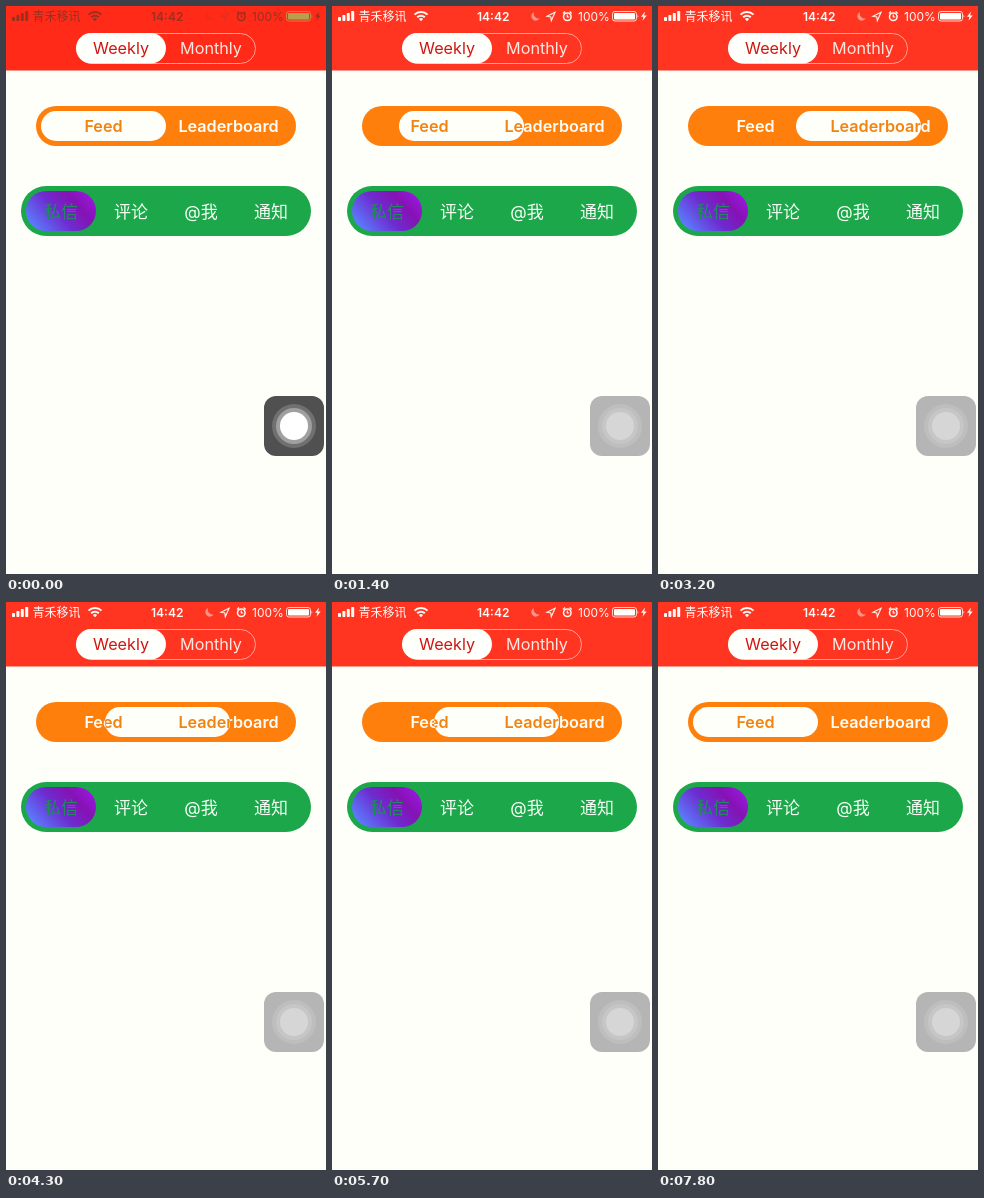
Recreate the animation shown at these times as an HTML page. Size 320 by 568 pixels, loop 8000 ms.

```html
<!DOCTYPE html>
<html lang="zh-CN">
<head>
<meta charset="utf-8">
<title>Segmented controls</title>
<style>
  html, body { margin: 0; width: 100%; height: 100%; overflow: hidden; background: #fffffa; }
  svg { display: block; width: 100%; height: 100%; }
  text { font: 16.2px Inter, "Noto Sans CJK SC", sans-serif; text-anchor: middle; }
  .bold text { font-weight: 600; }
  .tabs text { font-size: 17px; }
  #status text { font-size: 12px; text-anchor: start; }
</style>
</head>
<body>
<svg viewBox="0 0 320 568">
  <defs>
    <linearGradient id="violet" x1="0" y1=".75" x2="1" y2=".25">
      <stop offset="0" stop-color="#5a80ff"/>
      <stop offset=".45" stop-color="#6d2cd0"/>
      <stop offset=".75" stop-color="#8512b4"/>
      <stop offset="1" stop-color="#9a18dc"/>
    </linearGradient>
    <clipPath id="thumbClip"><rect id="clipThumb" y="105" width="125" height="30" rx="15"/></clipPath>
    <g id="labels" class="bold">
      <text x="97.5" y="126">Feed</text>
      <text x="222.5" y="126">Leaderboard</text>
    </g>
  </defs>

  <rect width="320" height="568" fill="#fffffa"/>
  <rect id="header" width="320" height="64.5"/>

  <g id="status">
    <rect x="6" y="11" width="3" height="4" rx=".7"/>
    <rect x="10.4" y="9" width="3" height="6" rx=".7"/>
    <rect x="14.8" y="7" width="3" height="8" rx=".7"/>
    <rect x="19.2" y="5" width="3" height="10" rx=".7"/>
    <text x="26.5" y="14.5">青禾移讯</text>
    <g fill="none" stroke="currentColor" stroke-width="2">
      <path d="M82.5 8.6a9.2 9.2 0 0 1 13 0M85.2 11.3a5.4 5.4 0 0 1 7.6 0"/>
    </g>
    <path d="M86.9 13a3 3 0 0 1 4.2 0L89 15.2z"/>
    <g class="bold"><text x="145" y="14.5">14:42</text></g>
    <g id="faint">
      <path opacity=".5" d="M202 6a4.5 4.5 0 1 0 5.6 6.5A5 5 0 0 1 202 6z"/>
      <path d="M223 6.3l-8 4 3.8.6.5 3.8z" fill="none" stroke="currentColor" stroke-width="1.1"/>
    </g>
    <g fill="none" stroke="currentColor">
      <circle cx="235.3" cy="10.7" r="3.8" stroke-width="1.5"/>
      <path d="M235.3 8.4v2.6h2M231 7.5l2-2M239.6 7.5l-2-2" stroke-width="1.2"/>
    </g>
    <text x="246" y="14.5">100%</text>
    <g id="battery">
      <rect x="280.5" y="5.5" width="24" height="9.5" rx="2.4" fill="none" stroke="currentColor" stroke-width=".8"/>
      <rect x="282" y="7" width="21" height="6.5" rx="1"/>
      <path d="M305.6 8.5q1.6 1.7 0 3.4z"/>
    </g>
    <path d="M313 5.5l-4 5.3h2.5l-1 4 4.2-5.4h-2.6z"/>
  </g>

  <rect x="70.5" y="27.5" width="179" height="30" rx="15" fill="none" stroke="#ffa195"/>
  <rect x="70" y="27" width="90" height="30.5" rx="15.2" fill="#fffffc"/>
  <text x="115" y="48" fill="#d01512">Weekly</text>
  <text x="205" y="48" fill="#ffe9e2">Monthly</text>

  <rect x="30" y="100" width="260" height="40" rx="20" fill="#ff7f0d"/>
  <use href="#labels" fill="#fffdf5"/>
  <g clip-path="url(#thumbClip)">
    <rect x="30" y="100" width="260" height="40" fill="#fffffa"/>
    <use href="#labels" fill="#f18312"/>
  </g>

  <rect x="15" y="180" width="290" height="50" rx="25" fill="#1ca84a"/>
  <rect x="20" y="185" width="70" height="40" rx="20" fill="url(#violet)"/>
  <g class="tabs" fill="#f5fff5">
    <text x="55" y="211.5" fill="#208a5c">私信</text>
    <text x="125" y="211.5">评论</text>
    <text x="195" y="211.5">@我</text>
    <text x="265" y="211.5">通知</text>
  </g>

  <rect id="pad" x="258" y="390" width="60" height="60" rx="12"/>
  <circle id="outer" cx="288" cy="420" r="22"/>
  <circle id="middle" cx="288" cy="420" r="18"/>
  <circle id="inner" cx="288" cy="420" r="14"/>
</svg>

<script>
const LOOP = 8000, STEP = 100;
const $ = id => document.getElementById(id);

// [time, thumb x]: four sweeps, each quicker than the last
const path = [
  [0, 35], [400, 35], [1400, 67], [2500, 109], [3200, 138], [3600, 160],
  [3700, 160], [4300, 99], [4800, 55], [5200, 35],
  [5300, 35], [5500, 60], [5700, 102], [5800, 160],
  [5900, 160], [6200, 35], [LOOP, 35]
];

// colours before and after the opening fade
const fades = {
  header: [[255, 43, 24], [255, 53, 33]],
  status: [[154, 48, 32], [255, 250, 246]],
  faint: [[226, 48, 30], [255, 244, 238]],
  battery: [[184, 158, 78], [255, 255, 250]],
  pad: [[80, 80, 80], [181, 181, 181]],
  outer: [[112, 112, 112], [190, 190, 190]],
  middle: [[160, 160, 160], [198, 198, 198]],
  inner: [[255, 255, 255], [214, 214, 214]]
};

const mix = (a, b, k) => a + (b - a) * k;

function thumbX(t) {
  const i = path.findIndex(([time]) => time > t);
  const [t0, x0] = path[i - 1], [t1, x1] = path[i];
  return mix(x0, x1, (t - t0) / (t1 - t0));
}

function draw(now) {
  const t = Math.floor(now % LOOP / STEP) * STEP;
  $("clipThumb").setAttribute("x", thumbX(t));
  const k = Math.min(1, t / 300);
  for (const [id, [from, to]] of Object.entries(fades)) {
    const color = `rgb(${from.map((c, i) => Math.round(mix(c, to[i], k)))})`;
    $(id).style.fill = $(id).style.color = color;
  }
  // outlined icons inherit the colour as stroke only
  document.querySelectorAll('[fill="none"]').forEach(el => el.style.fill = "none");
}

const start = performance.now();
function tick() {
  draw(performance.now() - start);
  requestAnimationFrame(tick);
}
tick();
</script>
</body>
</html>
```
